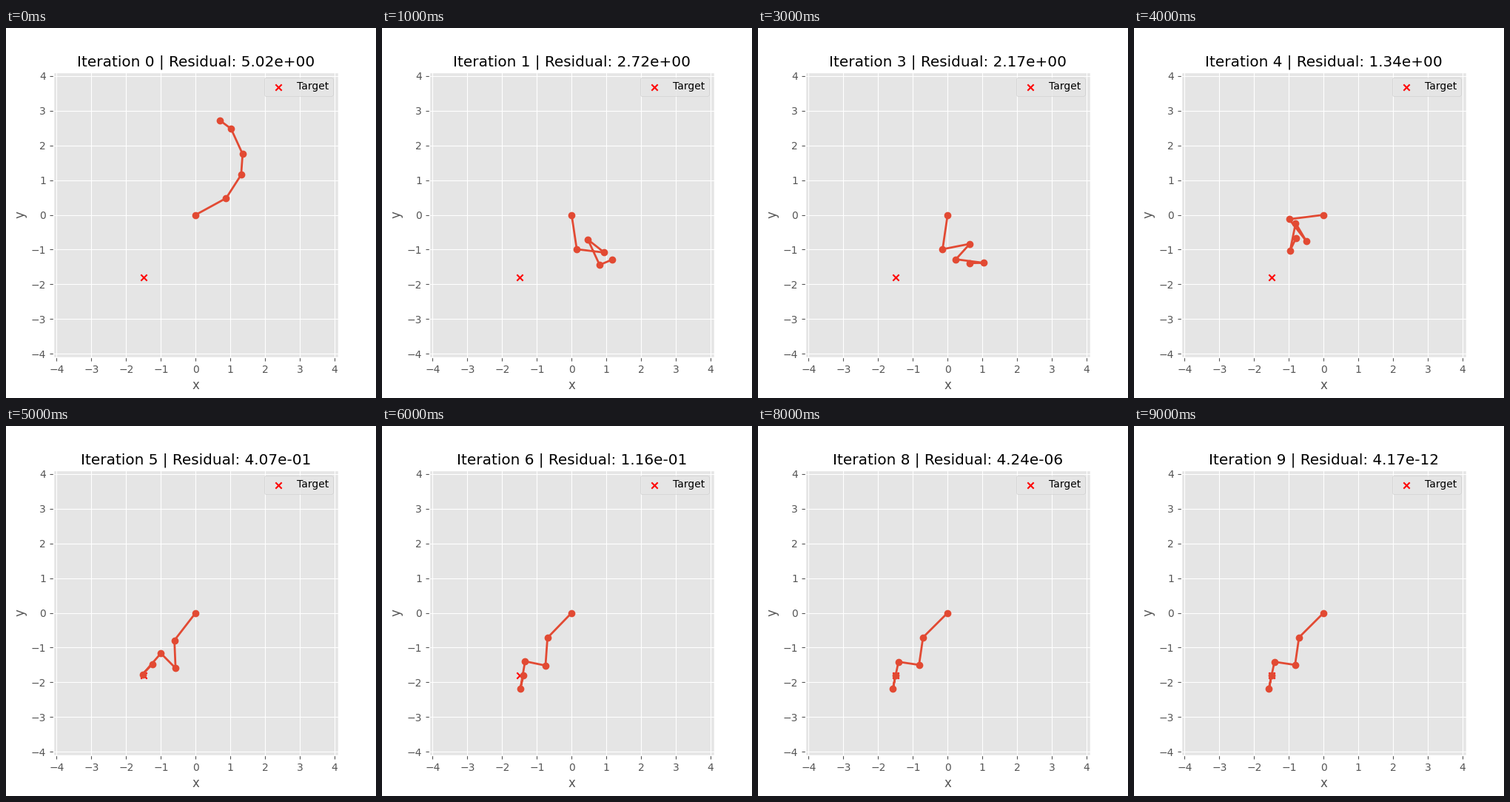
Animation of 500x500 px, one loop 10 s. Source, as a matplotlib script:

```python
import numpy as np
import matplotlib.pyplot as plt
from matplotlib.animation import FuncAnimation

LINKS = np.array([1.0, 0.8, 0.6, 0.8, 0.4])
TARGET = np.array([-1.5, -1.8])
STEPS = 10


def joints(theta):
    """Positions of all joints, base first, for relative angles."""
    angles = np.cumsum(theta)
    steps = LINKS[:, None] * np.column_stack([np.cos(angles), np.sin(angles)])
    return np.vstack([np.zeros(2), np.cumsum(steps, axis=0)])


def jacobian(points):
    arm = points[-1] - points[:-1]
    return np.vstack([-arm[:, 1], arm[:, 0]])


def solve():
    """Newton steps with the pseudo-inverse, one pose per iteration."""
    theta = np.full(len(LINKS), 0.5)
    poses = []
    for _ in range(STEPS):
        points = joints(theta)
        error = TARGET - points[-1]
        poses.append((points, np.linalg.norm(error)))
        theta = theta + np.linalg.pinv(jacobian(points)) @ error
    return poses


poses = solve()

plt.style.use("ggplot")
fig, ax = plt.subplots(figsize=(5, 5), dpi=100)
reach = LINKS.sum() + 0.5
ax.set_xlim(-reach, reach)
ax.set_ylim(-reach, reach)
ax.set_aspect("equal")
ax.set_xticks(range(-4, 5))
ax.set_yticks(range(-4, 5))
ax.set_xlabel("x")
ax.set_ylabel("y")

arm_line, = ax.plot([], [], "o-", lw=2)
ax.scatter(*TARGET, color="red", marker="x", label="Target")
ax.legend(loc="upper right")
title = ax.set_title("")


def update(i):
    points, residual = poses[i]
    arm_line.set_data(points[:, 0], points[:, 1])
    title.set_text(f"Iteration {i} | Residual: {residual:.2e}")
    return arm_line, title


anim = FuncAnimation(fig, update, frames=STEPS, interval=1000,
                     repeat=True, repeat_delay=0, blit=False)
plt.show()
```
